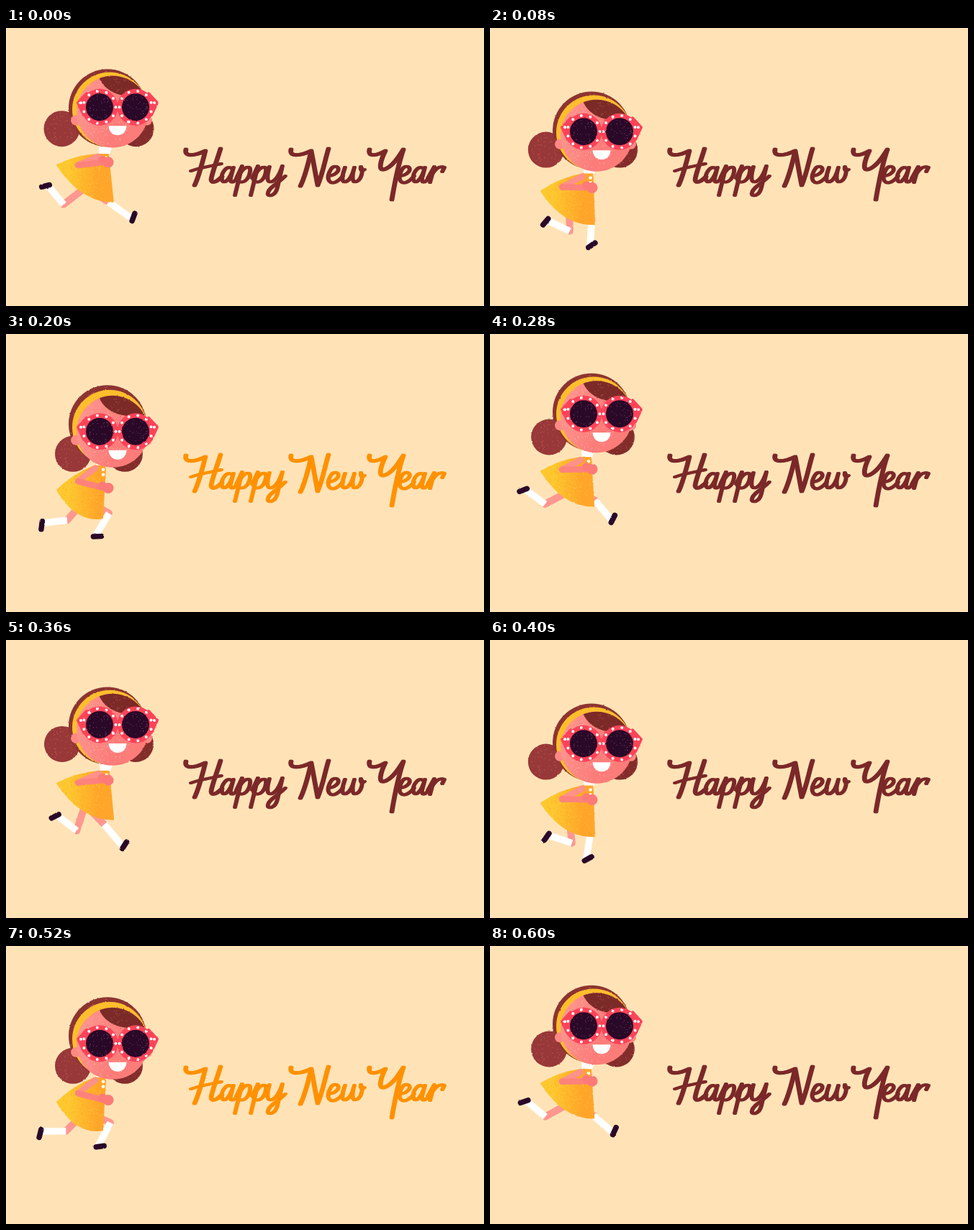
Write an HTML page that moves like this. It is 664 px wide and 387 px high and loops after 0.64 s.

```html
<!DOCTYPE html>
<html lang="en">
<head>
<meta charset="utf-8">
<title>Happy New Year</title>
<style>
  html, body { margin: 0; width: 100%; height: 100%; overflow: hidden; background: #ffe3b7; }
  svg { display: block; width: 100%; height: 100%; }
  .stroke { fill: none; stroke-linejoin: round; }
</style>
</head>
<body>
<svg viewBox="0 0 664 387">
  <defs>
    <filter id="rough" filterUnits="userSpaceOnUse" x="0" y="0" width="664" height="387" color-interpolation-filters="sRGB">
      <feTurbulence type="fractalNoise" baseFrequency=".3" numOctaves="2" seed="4"/>
      <feDisplacementMap in="SourceGraphic" scale="2" xChannelSelector="R" yChannelSelector="G"/>
    </filter>
    <linearGradient id="cloth" gradientUnits="userSpaceOnUse" x1="82" y1="0" x2="138" y2="0">
      <stop offset=".1" stop-color="#fdc82f"/><stop offset=".8" stop-color="#ffa62a"/>
    </linearGradient>
    <linearGradient id="cheek" x1="0" y1=".3" x2="1" y2=".6">
      <stop offset=".05" stop-color="#fd948d"/><stop offset=".6" stop-color="#fb7c79"/>
    </linearGradient>
    <clipPath id="faceClip"><circle r="50"/></clipPath>
    <clipPath id="dressClip"><path id="dressEdge"/></clipPath>

    <path id="a" d="M314 196C307 189 298 203 300 211C302 219 311 212 316 194L312 209C311 217 316 216 322 208"/>
    <path id="p" d="M320 209L328 192L318 233M323 207C329 193 341 189 339 200C337 213 327 218 322 212"/>
    <path id="e" d="M448 206C459 205 466 196 459 193C451 191 445 207 449 213C454 219 462 213 468 206"/>
    <g id="lettering">
      <g stroke-width="4.800">
        <path d="M250 169C247 180 262 178 277 171C272 190 268 207 262 219M298 168C293 185 286 202 285 211C286 218 294 213 300 207"/>
        <path d="M396 169C393 180 409 178 424 171C420 188 416 206 409 220M424 171C427 186 430 204 433 219C440 203 443 184 448 168"/>
        <path d="M505 169C502 180 515 178 527 171C520 185 517 199 525 197C536 194 545 180 552 169C545 190 540 215 536 239"/>
      </g>
      <path d="M257 199C270 194 286 192 299 189"/>
      <use href="#a"/>
      <use href="#p"/>
      <use href="#p" x="22"/>
      <path d="M359 208L366 193C362 207 362 216 369 214C376 212 381 201 384 192L377 222C374 235 362 236 364 229C366 221 380 215 388 206"/>
      <use href="#e"/>
      <path d="M467 207L471 194C466 207 466 216 472 214C478 212 482 202 484 194C480 207 481 216 486 214C493 212 497 200 493 193C492 198 494 200 498 197"/>
      <use href="#e" x="99"/>
      <use href="#a" x="266"/>
      <path d="M586 209L595 193L589 215M590 207C595 197 602 191 609 194L606 200"/>
    </g>
    <g id="rim">
      <circle cx="25" r="25.500" fill="#fd4358"/>
      <path d="M43 -19L55 -6L47 11Z" fill="#fd4358" stroke="#fd4358" stroke-width="4" stroke-linejoin="round"/>
      <path id="spots" fill="none" stroke="#fff" stroke-width="4" stroke-linecap="round"/>
      <circle cx="25" r="19" fill="#2a0828"/>
    </g>
  </defs>

  <rect width="664" height="387" fill="#ffe3b7"/>

  <g filter="url(#rough)">
    <g id="bunL"><circle r="25" fill="#983838"/><path class="grain" data-r="24" data-n="50" fill="#c06660"/></g>
    <g id="bunR"><circle r="25" fill="#832d2b"/><path class="grain" data-r="24" data-n="40" fill="#b45a55"/></g>

    <g id="legs"></g>

    <path id="collar" fill="#fff"/>
    <path id="dress" fill="url(#cloth)" stroke="url(#cloth)" stroke-width="2" stroke-linejoin="round"/>
    <g clip-path="url(#dressClip)">
      <g id="weave">
        <path class="grain" data-r="28" data-n="110" fill="#ffa526" transform="translate(-10 0)"/>
        <path class="grain" data-r="28" data-n="90" fill="#fed03f" transform="translate(2 0)"/>
      </g>
    </g>
    <g id="buttons" fill="#fff"><circle cx="5" cy="6" r="2.300"/><circle cx="5" cy="13" r="2.300"/></g>
    <path id="upperArm" class="stroke" stroke="#fe9189" stroke-width="8.500" stroke-linecap="round"/>
    <path id="foreArm" class="stroke" stroke="#fd827c" stroke-width="8.500" stroke-linecap="round"/>
    <g id="hand" fill="#fc7a78"><circle cx="-7" cy="-3" r="6"/><circle cx="1" r="7.500"/></g>

    <g id="hair"><circle r="54" fill="#8d3331"/><path class="grain" data-r="53" data-n="230" fill="#bb625b"/></g>
    <circle id="band" r="52" fill="#fdbe2c"/>
    <g id="face">
      <g fill="#fc8983"><circle cx="-51" cy="12" r="7"/><circle cx="48" cy="12" r="7"/></g>
      <circle r="50" fill="url(#cheek)"/>
      <g clip-path="url(#faceClip)">
        <path class="grain" data-r="46" data-n="260" fill="#feaaa0" transform="translate(-18 4)"/>
        <path d="M-19 -48C-11 -28 12 -17 46 -23L60 -60L-19 -60Z" fill="#7c2a27"/>
        <path class="grain" data-r="16" data-n="28" fill="#aa5450" transform="translate(13 -36)"/>
      </g>
    </g>
    <g id="glasses">
      <path d="M-8 -2Q0 -7 8 -2" class="stroke" stroke="#fd4358" stroke-width="5"/>
      <use href="#rim"/><use href="#rim" transform="scale(-1 1)"/>
      <path class="grain" data-r="17" data-n="32" fill="#71476c" transform="translate(-25 0)"/>
      <path class="grain" data-r="17" data-n="32" fill="#71476c" transform="translate(25 0)"/>
      <path d="M-12.500 26H12.500C12 35 6 39 0 39S-12 35 -12.500 26Z" fill="#fff"/>
    </g>
  </g>

  <g id="words" class="stroke" role="img" aria-label="Happy New Year" stroke-width="4" stroke-linecap="round">
    <use href="#lettering" x="-1"/><use href="#lettering" x="1"/>
  </g>
</svg>

<script>
const FRAME = 40, STEPS = 16, HALF = 8;
const HIP_X = 110, THIGH = 38, SHIN = 36;
const { cos, sin, hypot, sqrt, PI } = Math;
const $ = id => document.getElementById(id);
const set = (node, attrs) => { for (const k in attrs) node.setAttribute(k, attrs[k]); };
const move = (id, x, y) => set($(id), { transform: `translate(${x} ${y})` });
const radians = degrees => degrees * PI / 180;

let seed = 7;
const random = () => (seed = seed * 16807 % 2147483647) / 2147483647;

function speckle(radius, count) {
  let d = "";
  while (count--) {
    const angle = random() * PI * 2, r = radius * sqrt(random());
    d += `M${(r * cos(angle)).toFixed(1)} ${(r * sin(angle)).toFixed(1)}h1v1h-1z`;
  }
  return d;
}

document.querySelectorAll(".grain").forEach(node =>
  set(node, { d: speckle(+node.dataset.r, +node.dataset.n) }));

let spots = "M51 -6h.01";
for (let i = 0; i < 11; i++) {
  const angle = (i + .5) / 11 * PI * 2;
  spots += `M${25 + 22.5 * cos(angle)} ${22.5 * sin(angle)}h.01`;
}
set($("spots"), { d: spots });

function addPart(color, width, cap) {
  const node = document.createElementNS("http://www.w3.org/2000/svg", "path");
  set(node, { class: "stroke", stroke: color, "stroke-width": width, "stroke-linecap": cap });
  return $("legs").appendChild(node);
}
const legs = [PI, 0].map(offset => ({
  offset,
  skin: addPart("#fd978f", 10, "round"),
  sock: addPart("#fff", 9.5, "butt"),
  shoe: addPart("#2a0828", 7.5, "round")
}));

// The foot follows a closed loop; the knee comes from the two leg lengths.
function drawLeg({ offset, skin, sock, shoe }, stride, hipY) {
  const a = stride + offset;
  const x = 102.5 + 61 * cos(a) - 14.4 * sin(a) + 13.5 * cos(2 * a) + 7.2 * sin(2 * a);
  const y = 268.8 + 21.8 * cos(a) + 1.5 * sin(a) - 27.2 * cos(2 * a) + 16.4 * sin(2 * a);
  const toe = radians(48 - 118 * cos(a)), tx = cos(toe), ty = sin(toe);

  const reach = hypot(x - HIP_X, y - hipY);
  const ux = (x - HIP_X) / reach, uy = (y - hipY) / reach;
  const d = Math.min(reach, THIGH + SHIN);
  const along = (d * d + THIGH ** 2 - SHIN ** 2) / (2 * d);
  const bend = sqrt(Math.max(0, THIGH ** 2 - along ** 2));
  const knee = `${HIP_X + along * ux + bend * uy} ${hipY + along * uy - bend * ux}`;

  set(skin, { d: `M${HIP_X} ${hipY}L${knee}` });
  set(sock, { d: `M${knee}L${x - 3 * tx} ${y - 3 * ty}` });
  set(shoe, { d: `M${x - 5.5 * tx} ${y - 5.5 * ty}L${x + 5.5 * tx} ${y + 5.5 * ty}` });
}

function draw(step) {
  const beat = step % HALF, turn = beat / HALF * 2 * PI;
  const kick = 3.5 * cos(2 * turn) - 6.7 * sin(2 * turn);
  // Every part sways around its mean; a later peak makes it trail behind.
  const sway = (mean, size, peak, push = 1) => mean + size * cos(turn - radians(peak)) + push * kick;

  const top = sway(75, 27.2, 141);
  const faceY = sway(137, 29, 146);
  const inset = sway(4, 7.7, 237, -.37);
  const bunY = sway(162.6, 28, 158);
  const sx = sway(132.5, 2.5, 57, 0), sy = sway(189, 24.5, 136);
  const hemY = sway(215.2, 31.8, 151);
  const rx = sway(142.5, 8, 26, 0), ry = sway(259.7, 27.2, 142);
  const elbowY = sway(208.5, 26.7, 142);
  const handX = 141, handY = sway(211.5, 31.6, 153);
  const hipY = sway(234, 19, 137, .6);

  move("bunL", 79 + inset, bunY);
  move("bunR", 179 - inset, bunY);
  move("hair", 141, top + 54);
  move("band", 144, top + 52 + (faceY - 50 - top) * .45);
  move("face", 148, faceY);
  move("glasses", 155, sway(133.5, 30.4, 152));

  // The stride runs a little faster than the bounce.
  const stride = step * 1.02 / STEPS * 2 * PI;
  legs.forEach(leg => drawLeg(leg, stride, hipY));

  const back = `Q${(64 + sx) / 2 - 3} ${(hemY + sy) / 2 - 5} 71 ${hemY}`;
  const hem = `Q${(71 + rx) / 2 - 6} ${(hemY + ry) / 2 + 25} ${rx - 1} ${ry}`;
  const dress = `M${sx - 7} ${sy + 1}${back}${hem}L${sx + 8} ${sy + 1}Z`;
  set($("dress"), { d: dress });
  set($("dressEdge"), { d: dress });
  set($("collar"), { d: `M${sx - 5} ${sy - 9}H${sx + 13}L${sx + 9} ${sy + 4}H${sx - 4}Z` });
  move("weave", 111, (sy + ry) / 2 + 4);
  move("buttons", sx, sy);
  set($("upperArm"), { d: `M${sx - 6} ${sy + 4}L100 ${elbowY}` });
  set($("foreArm"), { d: `M100 ${elbowY}L${handX - 4} ${handY}` });
  move("hand", handX, handY);

  set($("words"), { stroke: beat >= 3 && beat < 7 ? "#ff9100" : "#7b2829" });
}

const start = performance.now();
function tick() {
  draw(Math.floor((performance.now() - start) / FRAME) % STEPS);
  requestAnimationFrame(tick);
}
tick();
</script>
</body>
</html>
```
